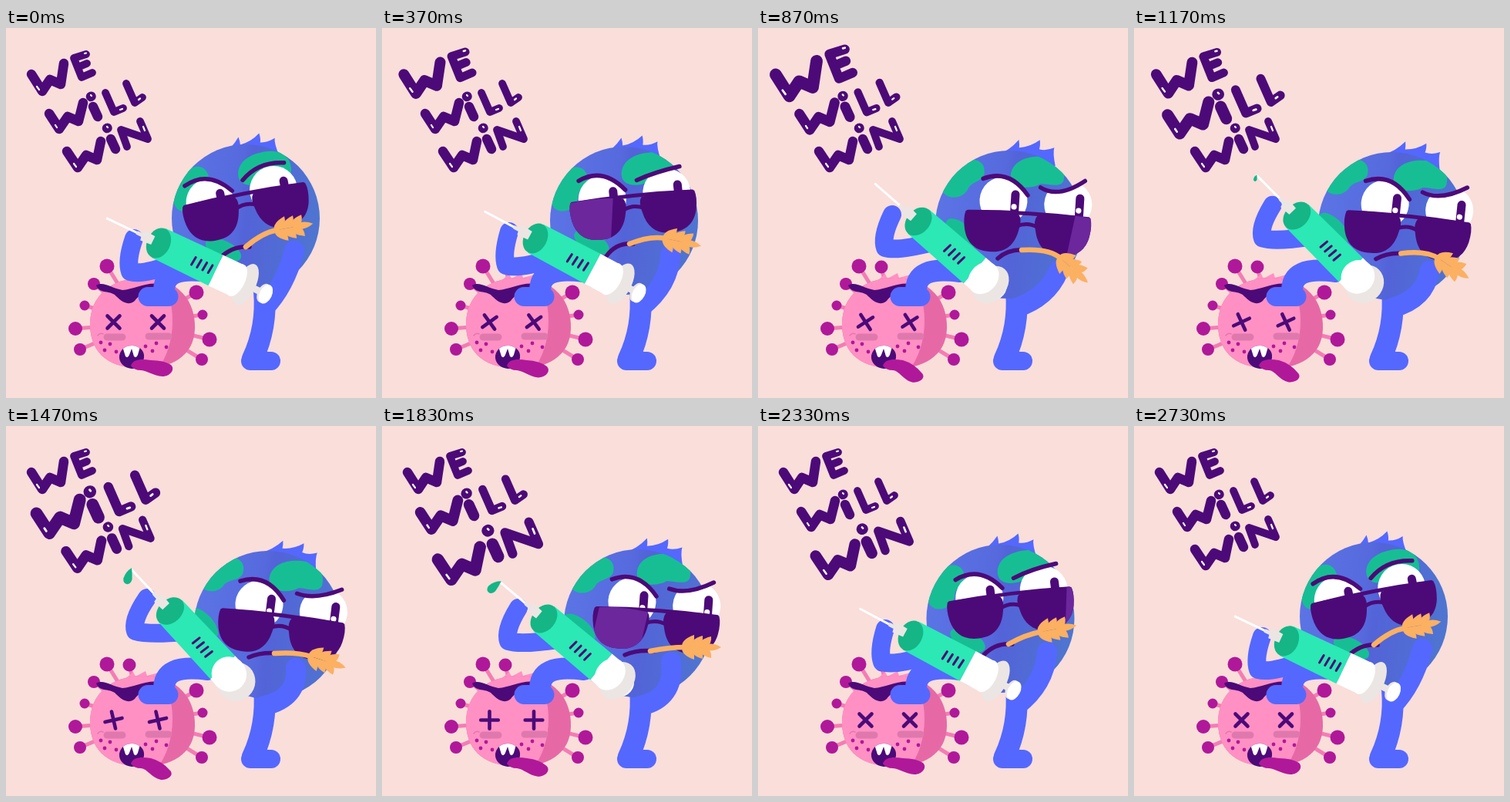
An HTML page with a canvas for the animation above (2760 ms loop, 480 px wide and 480 px high).

```html
<!DOCTYPE html>
<html lang="en">
<head>
<meta charset="utf-8">
<title>We will win</title>
<style>
html, body { margin: 0; width: 100%; height: 100%; overflow: hidden; background: #f9deda; }
canvas { display: block; width: 480px; height: 480px; }
</style>
</head>
<body>
<canvas id="stage" width="480" height="480" role="img" aria-label="WE WILL WIN"></canvas>
<script>
const c = document.getElementById('stage').getContext('2d');
const LOOP = 2760, RAD = Math.PI / 180;
const INK = '#4c0a78', BLUE = '#5468ff', MINT = '#2be8b5', GREEN = '#17be94',
      PINK = '#ff90c4', ROSE = '#e669a6', MAGENTA = '#b0189a', WHEAT = '#fbb062', GREY = '#ebe6e4';

// Poses of each moving part at these times, joined by a smooth periodic curve.
const TIMES = [0, 370, 870, 1470, 1830, 2330];
const POSE = {
  headX: [311, 314, 326, 340, 332, 314.5], headY: [247, 250, 255, 258, 256, 250],
  faceX: [313, 327, 349, 356, 355, 329], faceY: [239, 242, 265, 270, 264, 242],
  faceA: [-11, -6, 3.5, 7, 4, -7],
  eyeX: [-3, 3, 9, 10, 9, 3], eyeY: [-22, -24, -39, -35, -34, -24],
  browY: [-40, -28, -7, -14, -13, -29],
  hairX: [316, 324, 350, 369, 355, 324], hairY: [155, 157, 161, 166, 162, 157],
  hairA: [-2, 2, 9, 16, 11, 2],
  landAX: [240, 243, 266, 279, 272, 244], landAY: [208, 208, 194, 191, 192, 208],
  landAA: [-50, -45, -24, -12, -18, -45],
  landBX: [335, 345, 363, 377, 366, 345], landBY: [180, 181, 186, 194, 185, 181],
  landCX: [282, 272, 264, 256, 256, 272], landCY: [288, 278, 266, 256, 262, 278],
  mouthX: [277, 291, 311, 315, 315, 293], mouthY: [299, 296, 299, 300, 297, 297],
  stemX: [311, 321, 342, 348, 348, 325], stemY: [284, 280, 288, 295, 292, 283],
  earX: [352, 368, 393, 396, 393, 367], earY: [262, 273, 299, 299, 287, 267],
  earA: [-10, 12, 42, 18, 0, -10],
  capX: [198, 199, 208, 213, 210, 198], capY: [279, 273, 251, 240, 250, 272],
  tubeA: [25.5, 28, 41, 47, 40, 28],
  tubeEnd: [82, 84, 97, 100, 97, 84],
  rimW: [13, 14, 20, 25, 20, 14], rodEnd: [154, 152, 138, 124, 139, 152],
  handX: [166, 165, 174, 183, 177, 165], handY: [273, 264, 242, 223, 236, 263],
  bendX: [161, 161, 165, 168, 164, 161], bendY: [316, 308, 285, 266, 279, 306],
  armX: [374, 374, 390, 376, 375, 375], armY: [289, 294, 315, 314, 306, 293],
  elbowX: [362, 373, 375, 379, 380, 372], elbowY: [335, 333, 350, 353, 354, 335],
  cross: [0, 9, 12, 32, 45, 0],
  tongue: [0, 2, 11, 10, 4, 0]
};

function slope(v, i) {
  const n = v.length, k = ((i % n) + n) % n, next = (k + 1) % n;
  const dt = (next ? TIMES[next] : LOOP) - TIMES[k];
  return (v[next] - v[k]) / dt;
}
function tangent(v, i) {
  const a = slope(v, i - 1), b = slope(v, i);
  return a * b <= 0 ? 0 : 2 * a * b / (a + b);
}
function sample(v, t) {
  let i = TIMES.length - 1;
  while (TIMES[i] > t) i--;
  const j = (i + 1) % v.length, h = (j ? TIMES[j] : LOOP) - TIMES[i];
  const u = (t - TIMES[i]) / h, w = 1 - u;
  return v[i] * (1 + 2 * u) * w * w + h * tangent(v, i) * u * w * w +
         v[j] * u * u * (3 - 2 * u) - h * tangent(v, j) * u * u * w;
}

function fill(color, d) { c.fillStyle = color; c.fill(new Path2D(d)); }
function line(color, width, d) {
  c.strokeStyle = color; c.lineWidth = width;
  c.lineCap = c.lineJoin = 'round';
  c.stroke(new Path2D(d));
}
function oval(color, x, y, rx, ry = rx, a = 0) {
  c.fillStyle = color;
  c.beginPath();
  c.ellipse(x, y, rx, ry, a * RAD, 0, 7);
  c.fill();
}
function at(x, y, angle, draw) {
  c.save();
  c.translate(x, y);
  c.rotate(angle * RAD);
  draw();
  c.restore();
}

// Each word has bold strokes, slimmer strokes and small highlights.
const WORDS = [
  { x: 71, y: 58, start: 40, dx: 0, dy: 0,
    bold: 'M33 60L47 82L57 67L71 73L75 46',
    slim: 'M104 34L88 39L98 64L112 58M93 51L105 46',
    shine: 'M40 76L43 80M102 33L104 32.5' },
  { x: 115.5, y: 102, start: 695, dx: 0, dy: 0,
    bold: 'M56 111L69 131L80 115L94 121L100 97M110 89L110.5 88.8M113 102L119 115',
    slim: 'M129 84L140 109L152 104M156 72L167 97L177 90',
    shine: 'M64 126L66 129M110 87L111 88M148 106L151 105M172 93L174 91.5' },
  { x: 131, y: 151, start: 1280, dx: 25, dy: 45,
    bold: 'M79 160L93 181L104 165L118 171L123 147M131 130L131.5 129.8M136 144L142 157',
    slim: 'M157 154L149 132L184 144L174 121',
    shine: 'M88 176L91 180M131 128L132 129M178 128L180 133' }
];
function word(w, t) {
  const u = (t - w.start) / 1440;
  const p = u > 0 && u < 1 ? 0.28 * Math.sin(Math.PI * u) ** 2 : 0;
  c.save();
  c.translate(w.x + w.dx * p, w.y + w.dy * p);
  c.scale(1 + p, 1 + p);
  c.translate(-w.x, -w.y);
  line(INK, 12.5, w.bold);
  line(INK, 9.8, w.slim);
  line('#fff', 2.2, w.shine);
  c.restore();
}

const SPIKES = [[131, 309, 9.5], [160, 310, 8.5], [114, 332, 8], [102, 360, 6.5], [90, 390, 9],
  [96, 417, 8], [247, 343, 9.5], [255, 372, 6.5], [264, 404, 9.5], [254, 430, 8]];
const GERM = 'M109 386C108 347 138 324 178 324C224 325 246 354 245 390C244 426 214 442 176 442C137 441 110 425 109 386Z';

function germ(p) {
  for (const [x, y, r] of SPIKES) {
    line('#f37db4', 5, `M${x} ${y}L${x + (177 - x) * .4} ${y + (383 - y) * .4}`);
    oval(MAGENTA, x, y, r);
  }
  fill(PINK, 'M150 332L165 319L168 325L181 318L183 324L198 320L205 332Z');
  fill(ROSE, GERM);
  c.save();
  c.clip(new Path2D(GERM));
  oval(PINK, 146, 380, 70, 92);
  c.restore();
  fill(INK, 'M117 334C126 328 137 338 151 340C166 339 182 329 200 332L212 345L186 352C177 344 172 347 167 354C157 362 148 353 141 346C131 340 122 345 117 334Z');
  oval(INK, 231, 325, 5, 3, 15);

  for (const x of [139.5, 197])
    at(x, 381.5, p.cross, () => line(INK, 4.6, 'M-8 -8L8 8M8 -8L-8 8'));
  line('#df79ad', 9, 'M131 401L151 401M185 400L211 400');
  line('#df79ad', 1.5, 'M119 399Q122 395 126 397');
  for (const [x, y] of [[123, 408], [135, 410], [128, 418], [143, 420], [190, 419], [208, 414], [195, 409], [181, 413]])
    oval(MAGENTA, x, y, 2.4);

  const mouth = 'M147 425C149 416 155 412 164 412C174 413 180 419 179 428C177 438 171 442 163 442C153 441 146 434 147 425Z';
  fill(INK, mouth);
  c.save();
  c.clip(new Path2D(mouth));
  fill('#fff', 'M150 410L155 426Q158 429 160 424L163 416L166 426Q169 429 171 424L175 410Z');
  c.restore();
  const k = p.tongue;
  fill(MAGENTA, `M162 438C165 429 176 429 188 431Q${205 - k * .2} ${431 + k * .4} ${214 - k * .1} ${437 + k}` +
    `C${220 - k * .2} ${443 + k} ${213 - k * .2} ${452 + k * .7} ${203 - k * .2} ${452 + k * .7}` +
    `C${191 - k * .3} ${451 + k * .5} 184 445 175 444Q166 444 162 438Z`);
}

function head(p) {
  at(p.hairX, p.hairY, p.hairA, () =>
    fill(BLUE, 'M-38 9Q-24 2 -14 -14Q-12 -8 -12 -4Q2 -7 13 -18Q15 -11 14 -6Q23 -5 33 -11Q32 -4 38 12L20 34L-20 34Z'));
  c.save();
  c.translate(p.headX, p.headY);
  c.beginPath();
  c.arc(0, 0, 96, 0, 7);
  const g = c.createLinearGradient(-96, 0, 96, 20);
  g.addColorStop(0, '#5b74e4');
  g.addColorStop(.42, '#566ade');
  g.addColorStop(.5, '#5363d8');
  g.addColorStop(1, '#4e76d0');
  c.fillStyle = g;
  c.fill();
  c.clip();
  c.translate(-p.headX, -p.headY);
  at(p.landAX, p.landAY, p.landAA, () =>
    fill(GREEN, 'M-32 4C-31 -10 -12 -22 9 -19C28 -18 35 -5 27 7C20 15 8 9 0 16C-11 26 -31 19 -32 4Z'));
  at(p.landBX, p.landBY, p.faceA * .7, () =>
    fill(GREEN, 'M-35 7C-34 -13 -12 -21 11 -19C27 -17 37 -5 34 10C31 21 14 15 4 16C-8 24 -35 25 -35 7Z'));
  oval(GREEN, p.landCX, p.landCY, 25, 12, p.tubeA);
  c.restore();
}

const LENS = 'M-35 -23Q-5 -28 34 -22Q39 -16 35 -2C31 18 19 28 2 28C-19 29 -31 19 -35 1Q-38 -14 -35 -23Z';

function eye(x, y, brow, end) {
  c.save();
  c.translate(x, y);
  c.save();
  c.clip(new Path2D(brow + end));
  oval('#fff', 0, 0, 31);
  line(INK, 11, 'M15 -9L15 13');
  oval('#fff', 14, 7, 3.6);
  c.restore();
  line(INK, 5.5, brow);
  c.restore();
}

function glasses(t) {
  const mid = t < 1500 ? -62 + (t - 370) * .3 : -48 + (t - 1830) * .3;
  line(INK, 5, 'M-78 -22Q0 -27 78 -22');
  line(INK, 5, 'M-14 -7Q0 -14 14 -7');
  for (const side of [-1, 1]) {
    c.save();
    c.translate(46 * side, 0);
    c.scale(-side, 1);
    fill(INK, LENS);
    c.clip(new Path2D(LENS));
    c.scale(-side, 1);
    c.translate(mid - 46 * side, 0);
    fill('#6c279d', 'M-26 -32L38 -32L28 32L-36 32Z');
    c.restore();
  }
}

function face(p, t) {
  at(p.faceX, p.faceY, p.faceA, () => {
    eye(p.eyeX - 42, p.eyeY, 'M-28 -27Q5 -42 31 -9', 'L40 50L-40 50Z');
    eye(p.eyeX + 42, p.eyeY, `M-37 -20Q-13 ${p.browY} 20 -32`, 'L45 -20L45 50L-45 50Z');
    glasses(t);
  });
  line(INK, 5.5, `M${p.mouthX} ${p.mouthY}Q${p.stemX - 17} ${p.stemY - 2} ${p.stemX + 5} ${p.stemY}`);
}

function wheat(p) {
  const a = p.earA * RAD;
  line(WHEAT, 6.5, `M${p.stemX} ${p.stemY}Q${p.earX - 20 * Math.cos(a)} ${p.earY - 20 * Math.sin(a)} ${p.earX} ${p.earY}`);
  at(p.earX, p.earY, p.earA, () => {
    for (const side of [-1, 1]) {
      c.save();
      c.scale(1, side);
      for (let i = 0; i < 3; i++) {
        const x = i * 11 - 4;
        fill(WHEAT, `M${x} 0Q${x - 1} 10 ${x + 16} ${16 - i}Q${x + 17} 6 ${x + 11} 0Z`);
      }
      c.restore();
    }
    fill(WHEAT, 'M20 0Q32 -9 47 0Q32 9 20 0Z');
  });
}

function syringe(p) {
  at(p.capX, p.capY, p.tubeA, () => {
    const end = p.rodEnd, tube = p.tubeEnd;
    line(GREY, 9, `M115 0L${end - 4} 0`);
    oval(GREY, end - 3, 0, 8, 13);
    oval('#fff', end, 0, 8, 13);
    oval(GREY, 125, 0, p.rimW, 29 - (p.rimW - 13) * .3);
    fill(MINT, `M0 -21L${tube} -22L${tube} 22L0 21Z`);
    fill('#fff', `M${tube} -22L112 -22L112 22L${tube} 22Z`);
    oval('#fff', 112, 0, p.rimW - 2, 22.5);
    oval('#15b586', 0, 0, 15, 20.5);
    for (let i = 0; i < 4; i++) {
      const x = 51.5 + i * 8;
      line(INK, 3, `M${x} -4L${x - 1} 7`);
    }
    line('#fff', 3, 'M-74 0L-28 0');
    line(GREY, 5, 'M-30 0L-20 0');
    fill(GREY, 'M-23 -7Q-25 0 -23 7L-8 6L-8 -6Z');
  });
}

function drop(p, t) {
  const u = (t - 1050) / 1200;
  if (u <= 0 || u >= 1) return;
  const s = Math.min(1, 4 * u, 4 * (1 - u)), a = p.tubeA * RAD;
  const turn = 108 + 32 * Math.max(0, Math.min(1, (t - 1470) / 360));
  at(p.capX - 74 * Math.cos(a), p.capY - 74 * Math.sin(a), turn, () => {
    c.scale(s, s);
    fill('#15b586', 'M-2 0Q5 -3 12 -5C22 -6 23 5 14 6Q5 6 -2 0Z');
  });
}

function draw(t) {
  const p = {};
  for (const k in POSE) p[k] = sample(POSE[k], t);
  c.fillStyle = '#f9deda';
  c.fillRect(0, 0, 480, 480);
  WORDS.forEach(w => word(w, t));
  germ(p);

  line(BLUE, 28, 'M335 342Q339 388 320 429');
  line(BLUE, 24, 'M317 432L344 432');
  line(BLUE, 28, 'M205 344C204 318 222 311 262 316');
  line(BLUE, 25, 'M184 348.5L211 348.5');
  const lift = p.capY - 279;
  line(BLUE, 24, `M${p.handX} ${p.handY}Q${p.bendX - 5} ${p.bendY - 14} ${p.bendX} ${p.bendY}` +
    `Q${p.bendX + 16} ${p.bendY + 5} ${p.capX + 18} ${306 + lift}`);

  head(p);
  face(p, t);
  line(BLUE, 26, `M${p.armX} ${p.armY}Q${p.elbowX} ${p.elbowY} 335 363`);
  wheat(p);
  syringe(p);
  drop(p, t);
}

const begin = performance.now();
function tick(now) {
  draw(Math.max(0, now - begin) % LOOP);
  requestAnimationFrame(tick);
}
draw(0);
requestAnimationFrame(tick);
</script>
</body>
</html>
```
